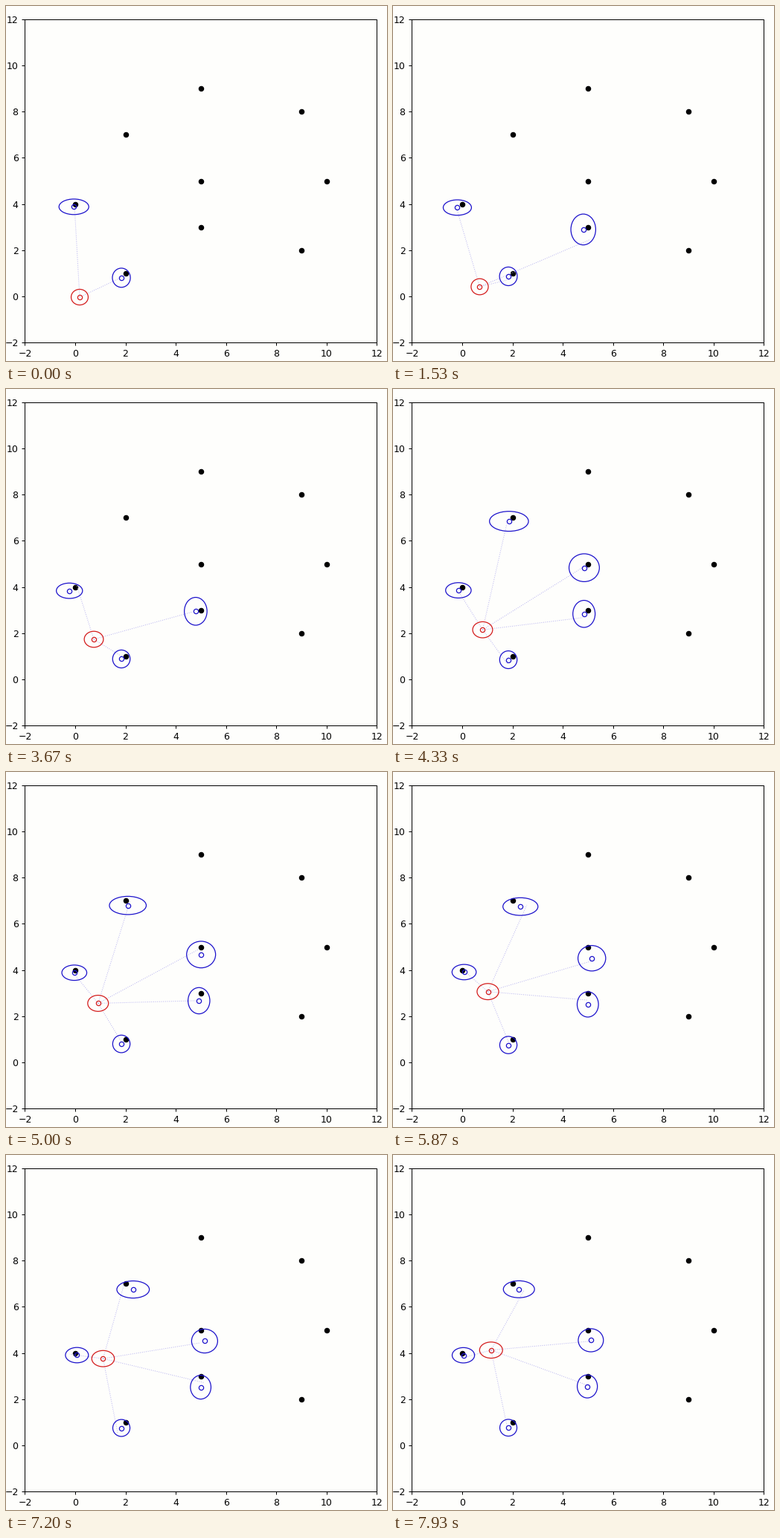
A matplotlib script that plays this animation: 512 by 478 pixels, repeating every 8000 ms.

```python
import numpy as np
import matplotlib.pyplot as plt
from matplotlib.animation import FuncAnimation
from matplotlib.patches import Ellipse

W, H, DPI = 512, 478, 64
FRAMES, INTERVAL = 200, 40
STEPS = 120                         # filter updates per loop
PT = 72 / DPI                       # points per pixel
LEFT, RIGHT, TOP, BOTTOM = 25.4, 498.4, 18, 453
PAPER, BLUE, RED, RAY = "#fefefc", "#1c12cc", "#d41c1c", "#b8b4f0"

# Landmarks in view, with the step at which each is first sighted.
SIGHTED = {(0, 4): -50, (2, 1): -50, (5, 3): 14, (5, 5): 58, (2, 7): 61}
UNSEEN = [(5, 9), (9, 8), (10, 5), (9, 2)]

# Robot pose (x, y) and map rotation error at a few steps.
KEYS = np.array([0, 23, 55, 88, 119])
POSES = np.array([(0.178, -0.037, 0.037), (0.696, 0.414, -0.010),
                  (0.741, 1.733, -0.022), (1.022, 3.063, 0.080),
                  (1.149, 4.125, 0.070)])
SLOPES = np.gradient(POSES, KEYS, axis=0)


def pose(n):
    """Cubic Hermite curve through the key poses."""
    i = min(np.searchsorted(KEYS, n, side="right") - 1, len(KEYS) - 2)
    h = KEYS[i + 1] - KEYS[i]
    u = (n - KEYS[i]) / h
    return ((1 + 2 * u) * (1 - u) ** 2 * POSES[i] + u * (1 - u) ** 2 * h * SLOPES[i]
            + u * u * (3 - 2 * u) * POSES[i + 1] + u * u * (u - 1) * h * SLOPES[i + 1])


def drifted(x, y, turn):
    """Where the turned and shifted map puts a landmark."""
    return x - 0.163 + turn * (y - 1), y - 0.148 - turn * (x - 0.7)


def radii(x, y, n, extra):
    """Uncertainty: a fixed part plus heading error growing with distance."""
    spin = 0.122 - 0.0004 * n
    base = 0.33 ** 2 + extra
    return np.sqrt(base + (spin * y) ** 2), np.sqrt(base + (spin * x) ** 2)


def reading(rng, x, y, mx, my):
    """End of a measured ray, with noise in range and bearing."""
    dist = np.hypot(mx - x, my - y) + rng.normal(0, 0.1)
    angle = np.arctan2(my - y, mx - x) + rng.normal(0, 0.05)
    return x + dist * np.cos(angle), y + dist * np.sin(angle)


fig = plt.figure(figsize=(W / DPI, H / DPI), dpi=DPI, facecolor=PAPER)
ax = fig.add_axes([LEFT / W, 1 - BOTTOM / H, (RIGHT - LEFT) / W, (BOTTOM - TOP) / H],
                  facecolor=PAPER)
ticks = range(-2, 13, 2)
ax.set(xlim=(-2, 12), ylim=(-2, 12), xticks=ticks, yticks=ticks)
ax.tick_params(length=4.4 * PT, width=PT, pad=4.4 * PT, labelsize=12.5 * PT,
               labelfontfamily="DejaVu Sans")
for spine in ax.spines.values():
    spine.set_linewidth(PT)

ax.plot(*zip(*SIGHTED, *UNSEEN), "o", color="black", ms=6.25 * PT, mew=1.25 * PT)


class Estimate:
    """A small ring with its uncertainty ellipse."""

    def __init__(self, color):
        self.oval = ax.add_patch(Ellipse((0, 0), 1, 1, fill=False, ec=color,
                                         lw=1.25 * PT, zorder=4))
        self.ring, = ax.plot([], [], "o", mfc="none", mec=color,
                             ms=6.25 * PT, mew=1.25 * PT, zorder=4)

    def show(self, on):
        self.oval.set_visible(on)
        self.ring.set_visible(on)

    def place(self, x, y, rx, ry):
        self.oval.set(center=(x, y), width=2 * rx, height=2 * ry)
        self.ring.set_data([x], [y])


robot = Estimate(RED)
marks = [Estimate(BLUE) for _ in SIGHTED]
rays = [ax.plot([], [], ":", color=RAY, lw=PT, zorder=3)[0] for _ in SIGHTED]


def update(frame):
    n = int((frame + 0.9) * STEPS / FRAMES)
    rng = np.random.default_rng(n)
    x, y, turn = pose(n)
    robot.place(x, y, *radii(x, y, n, 0.006))
    for (beacon, start), mark, ray in zip(SIGHTED.items(), marks, rays):
        seen = n >= start
        mark.show(seen)
        ray.set_visible(seen)
        if seen:
            mx, my = drifted(*beacon, turn)
            mark.place(mx, my, *radii(*beacon, n, 0.2 / (n - start + 1)))
            ray.set_data(*zip((x, y), reading(rng, x, y, mx, my)))
    return []


anim = FuncAnimation(fig, update, frames=FRAMES, interval=INTERVAL,
                     repeat=True, repeat_delay=0)
plt.show()
```
